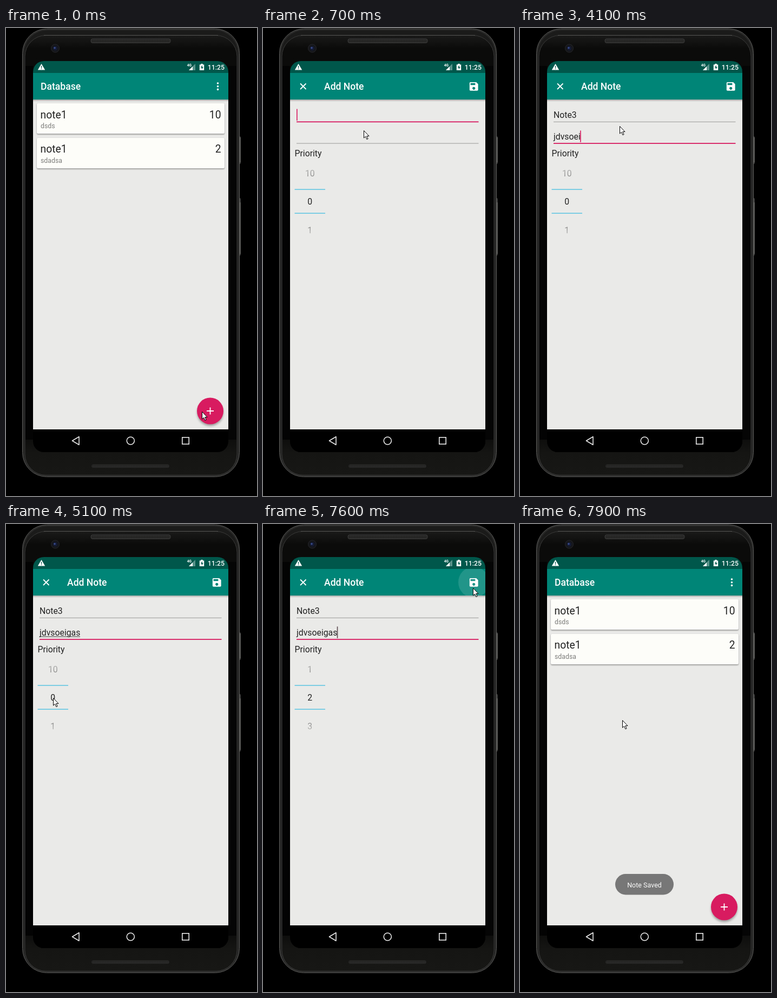
These frames come from a looping animation (464 px wide and 864 px high, 8 s). An HTML page:

```html
<!DOCTYPE html>
<html lang="en">
<head>
<meta charset="utf-8">
<title>Note app</title>
<style>
html, body { margin: 0; width: 100%; height: 100%; overflow: hidden; background: #000; }
svg { display: block; width: 464px; height: 864px; font-family: Roboto, "Open Sans", sans-serif; }
.title { font-size: 17.55px; font-weight: 500; fill: #fff; }
.large { font-size: 19.3px; fill: #222; }
.small { font-size: 12.3px; fill: #7c7c7a; }
.body { font-size: 15.8px; fill: #222; }
.mid { text-anchor: middle; }
.end { text-anchor: end; }
</style>
</head>
<body>
<svg viewBox="0 0 464 864" xmlns="http://www.w3.org/2000/svg">
<defs>
  <clipPath id="screen"><rect x="50" y="61" width="361" height="722" rx="20"/></clipPath>
  <clipPath id="toolbar"><rect x="50" y="83" width="361" height="49"/></clipPath>
  <linearGradient id="bezel" x1="0" y1="0" x2="0" y2="1">
    <stop offset="0" stop-color="#1a1a19"/><stop offset=".03" stop-color="#0b0b0a"/>
    <stop offset=".9" stop-color="#0a0a09"/><stop offset=".95" stop-color="#151513"/>
    <stop offset="1" stop-color="#171715"/>
  </linearGradient>
  <linearGradient id="drop" x1="0" y1="0" x2="0" y2="1">
    <stop offset="0" stop-color="#000" stop-opacity=".28"/><stop offset="1" stop-color="#000" stop-opacity="0"/>
  </linearGradient>
  <linearGradient id="fade" gradientUnits="userSpaceOnUse" x1="0" y1="241" x2="0" y2="399">
    <stop offset="0" stop-color="#000"/><stop offset=".455" stop-color="#fff"/>
    <stop offset=".545" stop-color="#fff"/><stop offset="1" stop-color="#000"/>
  </linearGradient>
  <mask id="wheelMask" maskUnits="userSpaceOnUse" x="50" y="241" width="80" height="158" style="color-interpolation:sRGB;mask-type:luminance">
    <rect x="50" y="241" width="80" height="158" fill="url(#fade)"/>
  </mask>
  <pattern id="mesh" width="3" height="3" patternUnits="userSpaceOnUse">
    <rect width="3" height="3" fill="#2b2b2a"/><circle cx="1" cy="1" r=".8" fill="#151514"/>
  </pattern>
  <filter id="soft" x="-30%" y="-30%" width="160%" height="170%"><feGaussianBlur stdDeviation="2.2"/></filter>
  <filter id="softCard" x="-5%" y="-15%" width="110%" height="130%"><feGaussianBlur stdDeviation=".9"/></filter>
  <g id="frame">
    <rect x="50" y="61" width="361" height="722" fill="#000"/>
    <rect x="50" y="132" width="361" height="609" fill="#eaeae8"/>
    <rect x="50" y="61" width="361" height="22" fill="#00574b"/>
    <rect x="50" y="83" width="361" height="49" fill="#008577"/>
    <rect x="50" y="132" width="361" height="4" fill="url(#drop)"/>
  </g>
  <g id="card">
    <rect x="57" y="140" width="347" height="56.5" rx="2" fill="#000" opacity=".38" filter="url(#softCard)"/>
    <rect x="57" y="139" width="347" height="56" rx="2" fill="#fdfdf9"/>
  </g>
</defs>

<rect width="464" height="864" fill="#000"/>
<g id="phone">
  <path d="M430 200h2.5q1.5 0 1.5 3v45q0 3-1.5 3H430zM430 314h2.5q1.5 0 1.5 3v100q0 3-1.5 3H430z" fill="#3c3c3b"/>
  <path d="M433 202v46M433 322v95" stroke="#777775"/>
  <rect x="30.5" y="1.5" width="401" height="827" rx="45" fill="#1b1b1a" stroke="#636361"/>
  <rect x="32.5" y="3.5" width="397" height="823" rx="43" fill="none" stroke="#2e2e2d" stroke-width="1.5"/>
  <rect x="35" y="13.5" width="392" height="812" rx="39" fill="url(#bezel)" stroke="#393938"/>
  <path d="M70 13.5H392" stroke="#565654"/>
  <rect x="36" y="70" width="14" height="690" fill="#030303"/>
  <rect x="411" y="70" width="15" height="690" fill="#050505"/>
  <rect x="157" y="20" width="147" height="7.5" rx="3" fill="url(#mesh)" stroke="#3b3b3a"/>
  <rect x="158.5" y="806" width="143" height="5.5" rx="2.5" fill="url(#mesh)" stroke="#262625"/>
  <circle cx="91" cy="37.5" r="7.5" fill="#15161a" stroke="#26272b"/>
  <circle cx="91" cy="37.5" r="4" fill="#141a33"/>
  <circle cx="90" cy="36.8" r="1.8" fill="#3a4d8c"/>
</g>

<g clip-path="url(#screen)">
  <g id="list">
    <use href="#frame"/>
    <text class="title" x="64" y="114">Database</text>
    <g fill="#fff"><circle cx="391.5" cy="102" r="1.8"/><circle cx="391.5" cy="107.7" r="1.8"/><circle cx="391.5" cy="113.4" r="1.8"/></g>
    <use href="#card"/><use href="#card" y="64"/>
    <text class="large" x="63.5" y="166.5">note1</text><text class="large end" x="397.5" y="166.5">10</text>
    <text class="small" x="64" y="185">dsds</text>
    <text class="large" x="63.5" y="230">note1</text><text class="large end" x="397.5" y="230">2</text>
    <text class="small" x="64" y="248.5">sdadsa</text>
    <circle cx="377.5" cy="710.5" r="24" fill="#000" opacity=".35" filter="url(#soft)"/>
    <circle cx="377.5" cy="707" r="24.5" fill="#d81b60"/>
    <circle id="fabRipple" cx="377.5" cy="707" r="0" fill="#fff" opacity=".22"/>
    <path d="M371 707h13M377.5 700.5v13" stroke="#fff" stroke-width="1.8"/>
  </g>
  <g id="editor">
    <use href="#frame"/>
    <g clip-path="url(#toolbar)"><circle id="saveRipple" cx="389.5" cy="107.5" r="0" fill="#fff" opacity=".13"/></g>
    <path d="M69 102.5l10.5 10.5M79.5 102.5L69 113" stroke="#fff" stroke-width="1.8"/>
    <text class="title" x="113" y="114">Add Note</text>
    <path transform="translate(379.2 97.3) scale(.878)" fill="#fff" d="M17 3H5c-1.11 0-2 .9-2 2v14c0 1.1.89 2 2 2h14c1.1 0 2-.9 2-2V7l-4-4zm-5 16c-1.66 0-3-1.34-3-3s1.34-3 3-3 3 1.34 3 3-1.34 3-3 3zm3-10H5V5h10v4z"/>
    <text id="name" class="body" x="62" y="166.3"></text>
    <text id="desc" class="body" x="62" y="206.3"></text>
    <rect id="mark" x="62" y="207.5" width="75" height="1" fill="#333"/>
    <rect id="nameLine" x="62" width="336.5"/>
    <rect id="descLine" x="62" width="336.5"/>
    <rect id="caret" width="1.6" height="21.5"/>
    <text class="body" x="58.5" y="237">Priority</text>
    <g id="wheel" mask="url(#wheelMask)"></g>
    <path d="M58.5 298H115M58.5 342H115" stroke="#5ac3e2" stroke-width="1.7"/>
  </g>
  <g id="system">
    <path d="M65.5 66l6.7 11.6H58.8z" fill="#fff"/>
    <path d="M65.5 70v3.7M65.5 74.7v1.4" stroke="#00574b" stroke-width="1.3"/>
    <text x="334.8" y="71" font-size="6.6" font-weight="700" fill="#fff">4G</text>
    <path d="M350 66v12h-12z" fill="#fff" opacity=".35"/>
    <path d="M345 71v7h-7z" fill="#fff"/>
    <path d="M360.3 66h3.4v1.4h2.5V78h-8.4V67.400h2.500z" fill="#fff"/>
    <path d="M362.8 68.800l-3 4.500h2v3.300l3-4.500h-2z" fill="#00574b"/>
    <text x="404" y="76.500" class="end" font-size="12.300" font-weight="500" fill="#fff">11:25</text>
    <g fill="none" stroke="#e8e8e8" stroke-width="1.600">
      <path d="M122.500 762L135 754.500v15z" stroke-linejoin="round"/>
      <circle cx="230.300" cy="762" r="7"/>
      <rect x="325.800" y="755.800" width="12.400" height="12.400"/>
    </g>
    <g id="toast">
      <rect x="176" y="646" width="108" height="38.500" rx="19.250" fill="#616161"/>
      <text class="mid" x="230" y="670.500" font-size="12.500" fill="#fff">Note Saved</text>
    </g>
  </g>
</g>
<path id="cursor" d="M0 0V13.500L3.100 10.700 5.400 16l2.200-1-2.300-5H9.500z" fill="#fff" stroke="#000" stroke-linejoin="round"/>
</svg>
<script>
const LOOP = 8000, STEP = 100, ROW = 52.5;
const $ = id => document.getElementById(id);
const clamp = v => Math.max(0, Math.min(1, v));
const span = (t, from, to) => clamp((t - from) / (to - from));
const within = (t, ranges) => ranges.some(([a, b]) => t >= a && t < b);

function set(id, attrs) {
  for (const k in attrs) $(id).setAttribute(k, attrs[k]);
}

// [time, x, y] of the pointer tip
const pointer = [
  [0, 363, 709], [300, 363, 709], [700, 187, 190], [900, 185, 182],
  [4800, 185, 182], [5100, 88, 322], [5400, 88, 322], [5700, 180, 181],
  [5800, 269, 200], [6000, 150, 240], [6100, 97, 252], [6300, 97, 252],
  [6700, 379, 130], [6800, 379, 130], [7000, 389, 119], [7600, 389, 119], [7900, 190, 363]
];
const nameKeys = [[1500, "N"], [1900, "No"], [2100, "Note"], [2900, "Note3"]];
const descKeys = [
  [3600, "jd"], [3700, "jdv"], [3900, "jdvs"], [4000, "jdvsoe"], [4100, "jdvsoei"],
  [4200, "jdvsoeig"], [4300, "jdvsoeiga"], [4400, "jdvsoeigas"]
];
const caretOn = [[300, 1000], [1500, 2700], [2900, 5000], [5500, 6000], [6500, 7000], [7500, 8000]];

function pointerAt(t) {
  const i = pointer.findIndex(p => p[0] > t);
  if (i < 0) return pointer[pointer.length - 1].slice(1);
  const a = pointer[i - 1], b = pointer[i], u = span(t, a[0], b[0]);
  return [a[1] + (b[1] - a[1]) * u, a[2] + (b[2] - a[2]) * u];
}

const typed = (keys, t) => keys.reduce((s, [at, text]) => t >= at ? text : s, "");

function drawLine(id, y, focused) {
  set(id, { y: focused ? y - .2 : y + .2, height: focused ? 1.8 : 1, fill: focused ? "#d81b60" : "#9a9a98" });
}

const digits = Array.from({ length: 5 }, () => {
  const el = document.createElementNS("http://www.w3.org/2000/svg", "text");
  el.setAttribute("class", "body mid");
  el.setAttribute("x", 86.8);
  return $("wheel").appendChild(el);
});

function drawWheel(t) {
  const pos = 2 - 2 * Math.pow(1 - span(t, 5400, 6400), 2.83);
  const base = Math.round(pos);
  digits.forEach((el, i) => {
    const n = base + i - 2;
    el.textContent = (n + 11) % 11;
    el.setAttribute("y", 326.3 + (n - pos) * ROW);
  });
}

function drawEditor(t) {
  const second = t >= 3200;
  $("name").textContent = typed(nameKeys, t);
  $("desc").textContent = typed(descKeys, t);
  drawLine("nameLine", 172.6, !second);
  drawLine("descLine", 212.3, second);
  const width = $(second ? "desc" : "name").getComputedTextLength();
  set("caret", {
    x: 62 + width - (width ? .6 : 0), y: second ? 189.3 : 149.5,
    fill: t >= 6900 ? "#5c4a50" : "#d81b60", opacity: within(t, caretOn) ? 1 : 0
  });
  set("mark", { opacity: within(t, [[4500, 7400]]) ? 1 : 0 });
  set("saveRipple", { r: 28.5 * Math.sqrt(span(t, 7300, 7600)) });
  drawWheel(t);
}

function drawWindow(t) {
  const open = span(t, 250, 600), close = span(t, 7600, 7850);
  const y = 58 * (Math.pow(1 - open, 5) + close * close);
  const alpha = span(t, 250, 450) * (1 - span(t, 7700, 7850));
  set("editor", { transform: `translate(0 ${y})`, opacity: alpha });
}

function draw(t) {
  drawEditor(t);
  drawWindow(t);
  set("fabRipple", { r: t < 600 ? 24.5 * Math.sqrt(span(t, 0, 300)) : 0 });
  set("toast", { opacity: span(t, 7650, 7950) });
  set("cursor", { transform: `translate(${pointerAt(t).map(Math.round).map(v => v - .5)})` });
}

function tick() {
  const t = performance.now() % LOOP;
  draw(Math.floor(t / STEP) * STEP);
  requestAnimationFrame(tick);
}
tick();
</script>
</body>
</html>
```
